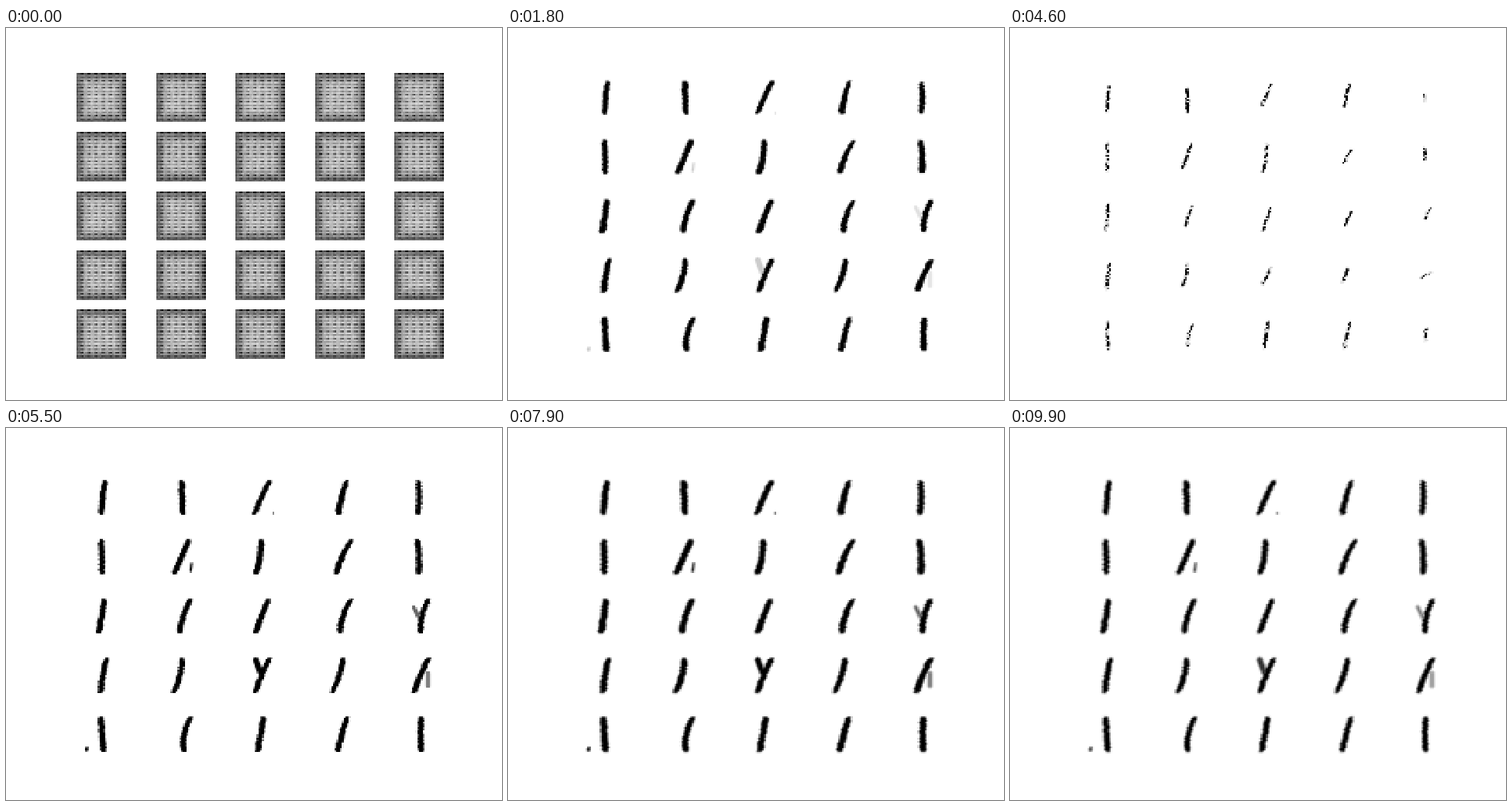
An HTML page with a canvas that plays this animation: 640 px wide and 480 px high, repeating every 10000 ms.

```html
<!DOCTYPE html>
<html lang="en">
<head>
<meta charset="utf-8">
<title>Generated strokes</title>
<style>
html, body { margin: 0; width: 100%; height: 100%; overflow: hidden; background: #fff; }
canvas { display: block; width: 640px; height: 480px; }
</style>
</head>
<body>
<canvas id="stage" width="640" height="480"></canvas>
<script>
const LOOP = 10000, STEP = 100, CELLS = 28, CENTER = 14.4;
const stage = document.getElementById('stage').getContext('2d');
const small = document.createElement('canvas');
small.width = small.height = CELLS;
const smallCtx = small.getContext('2d');
const pixels = smallCtx.createImageData(CELLS, CELLS);
stage.imageSmoothingEnabled = false;

const clamp = v => Math.max(0, Math.min(1, v));
const mix = (a, b, u) => a + (b - a) * u;
const hash = (a, b, c = 0) => {
  const s = Math.sin(a * 12.9898 + b * 78.233 + c * 37.719) * 43758.5453;
  return s - Math.floor(s);
};

// Where each stroke starts and ends, across a tile
const heads = [
  16, 14.3, 19.3, 18, 13.5,
  14, 18.2, 14.7, 20.3, 13.1,
  15.4, 19.3, 18.7, 20.4, 19.5,
  17, 14.4, 19.2, 15.6, 19.6,
  14, 19.2, 15.8, 18.2, 15.2
];
const feet = [
  14.1, 15, 10.5, 13, 13.3,
  14.1, 9.7, 11.3, 12, 13.8,
  12.3, 13.4, 11, 14, 14.8,
  13.6, 9.6, 10.9, 9.5, 11.3,
  15.4, 15.3, 12.3, 12.6, 15.1
];

// Loose specks and side branches
const marks = [
  { tile: 2, from: [21.4, 23], to: [21.4, 23], width: 1, ink: .9 },
  { tile: 6, from: [20, 18], to: [19.4, 22], width: 1.2, ink: .9 },
  { tile: 14, from: [11, 9], to: [14, 15], width: 2.2, ink: .6 },
  { tile: 17, from: [11.5, 5.5], to: [14, 12], width: 3.2, ink: 1 },
  { tile: 19, from: [19, 13], to: [19, 20], width: 2.4, ink: .5 },
  { tile: 20, from: [5.7, 22.8], to: [6, 22], width: 1.6, ink: 1 }
];

// lean scales the slant, flare varies the ends, trim shortens, gaps drop cells
const phases = [
  { at: 0, weight: 3.3, soft: 3, lean: .9, shift: .6, flare: .5, trim: .12, gaps: .05, marks: 0 },
  { at: 1800, weight: 3.2, soft: 1.1, lean: .95, shift: .6, flare: .5, trim: .12, gaps: 0, marks: .2 },
  { at: 3600, weight: 4.2, soft: .9, lean: .85, shift: -.2, flare: .7, trim: 0, gaps: 0, marks: .8 },
  { at: 4600, weight: 1.7, soft: .8, lean: .6, shift: .8, flare: 0, trim: 1, gaps: .4, marks: 0, ease: 3 },
  { at: 5300, weight: 3.2, soft: .9, lean: 1, shift: 0, flare: .2, trim: 0, gaps: 0, marks: 1 },
  { at: 6500, weight: 3.3, soft: 1, lean: 1, shift: 0, flare: .2, trim: 0, gaps: 0, marks: 1 },
  { at: 7900, weight: 3.5, soft: 1.5, lean: 1, shift: .1, flare: .3, trim: 0, gaps: 0, marks: 1 },
  { at: 9900, weight: 3.1, soft: 1.7, lean: 1, shift: .2, flare: .2, trim: 0, gaps: 0, marks: .8 }
];

function stateAt(time) {
  const next = Math.max(1, phases.findIndex(phase => phase.at >= time));
  const a = phases[next - 1], b = phases[next];
  const u = ((time - a.at) / (b.at - a.at)) ** (b.ease || 1);
  const state = {};
  for (const key in a) state[key] = mix(a[key], b[key], u);
  return state;
}

function makeStroke(tile, frame, { weight, lean, shift, flare, trim }) {
  const wobble = k => (hash(tile, frame, k) - .5) * .4;
  const place = x => CENTER + (x - CENTER) * lean + shift;
  const top = place(heads[tile]) + wobble(1), bottom = place(feet[tile]) + wobble(2);
  const shorten = trim * (1 + tile % 5) * 1.5;
  return {
    top, bottom,
    // The waist is pulled toward the middle of the tile
    middle: mix((top + bottom) / 2, CENTER + shift, .55),
    width: weight + wobble(3),
    topWidth: weight * (1 + flare * (hash(tile, 4) - .4)),
    bottomWidth: weight * (1 + flare * (hash(tile, 5) - .3)),
    start: 4.2 + trim * 1.5 + shorten * hash(tile, 6),
    end: 24 - trim - shorten * hash(tile, 7)
  };
}

function strokeInk(s, x, y, soft) {
  const length = s.end - s.start, v = clamp((y - s.start) / length);
  const bend = 2 * (s.top + s.bottom - 2 * s.middle), slant = s.bottom - s.top - bend;
  const center = s.top + slant * v + bend * v * v;
  const slope = (slant + 2 * bend * v) / length;
  const width = v < .5 ? mix(s.topWidth, s.width, v * 2) : mix(s.width, s.bottomWidth, v * 2 - 1);
  const endGap = Math.min(y - s.start, s.end - y);
  const half = width / 2 * (.65 + .35 * clamp(endGap / 2));
  const gap = Math.abs(x - center) / Math.hypot(1, slope * .6);
  return clamp((half - gap) / soft + .5) * clamp(endGap / soft + .5);
}

function markInk({ from: [x1, y1], to: [x2, y2], width, ink }, x, y, soft) {
  const dx = x2 - x1, dy = y2 - y1;
  const u = clamp(((x - x1) * dx + (y - y1) * dy) / (dx * dx + dy * dy || 1));
  const gap = Math.hypot(x - x1 - u * dx, y - y1 - u * dy);
  return ink * clamp((width / 2 - gap) / soft + .5);
}

// Untrained output: rows of dark dashes four cells apart, darker at the border
function weaveInk(tile, px, py) {
  const edge = Math.min(px, py, CELLS - 1 - px, CELLS - 1 - py);
  const row = py % 2 ? .22 : .31;
  const dash = py % 2 ? 0 : Math.max(0, Math.cos((px - 2.6) * Math.PI / 2));
  const depth = py % 4 ? .18 : .42;
  const grain = (hash(px, py, tile) - .5) * .12;
  return clamp(row + dash * depth + grain + .38 * (1 - clamp(edge / 7)) ** 1.6);
}

function drawTile(tile, frame, state) {
  const stroke = makeStroke(tile, frame, state);
  const ownMarks = marks.filter(mark => mark.tile === tile);
  const weave = frame ? .25 * Math.exp(-frame / 3) : 1;

  for (let py = 0; py < CELLS; py++) {
    const ragged = (hash(py, tile, 8) - .5) * .6;
    for (let px = 0; px < CELLS; px++) {
      const x = px + .5, y = py + .5;
      let ink = strokeInk(stroke, x + ragged, y, state.soft);
      for (const mark of ownMarks) {
        ink = Math.max(ink, state.marks * markInk(mark, x, y, state.soft));
      }
      if (hash(px, py, tile) < state.gaps) ink *= .15;
      ink = mix(ink, weaveInk(tile, px, py), weave);
      const p = (py * CELLS + px) * 4;
      pixels.data.fill(255 * (1 - ink), p, p + 3);
      pixels.data[p + 3] = 255;
    }
  }
  smallCtx.putImageData(pixels, 0, 0);
  const x = 90.9 + 102.62 * (tile % 5), y = 57.6 + 76.466 * Math.floor(tile / 5);
  const left = Math.round(x), top = Math.round(y);
  stage.drawImage(small, left, top, 64, Math.round(y + 63.72) - top);
}

function draw(frame) {
  const state = stateAt(frame * STEP);
  stage.fillStyle = '#fff';
  stage.fillRect(0, 0, 640, 480);
  for (let tile = 0; tile < 25; tile++) drawTile(tile, frame, state);
}

const start = performance.now();
let shown = -1;
function tick() {
  const frame = Math.floor((performance.now() - start) % LOOP / STEP);
  if (frame !== shown) draw(shown = frame);
  requestAnimationFrame(tick);
}
tick();
</script>
</body>
</html>
```
